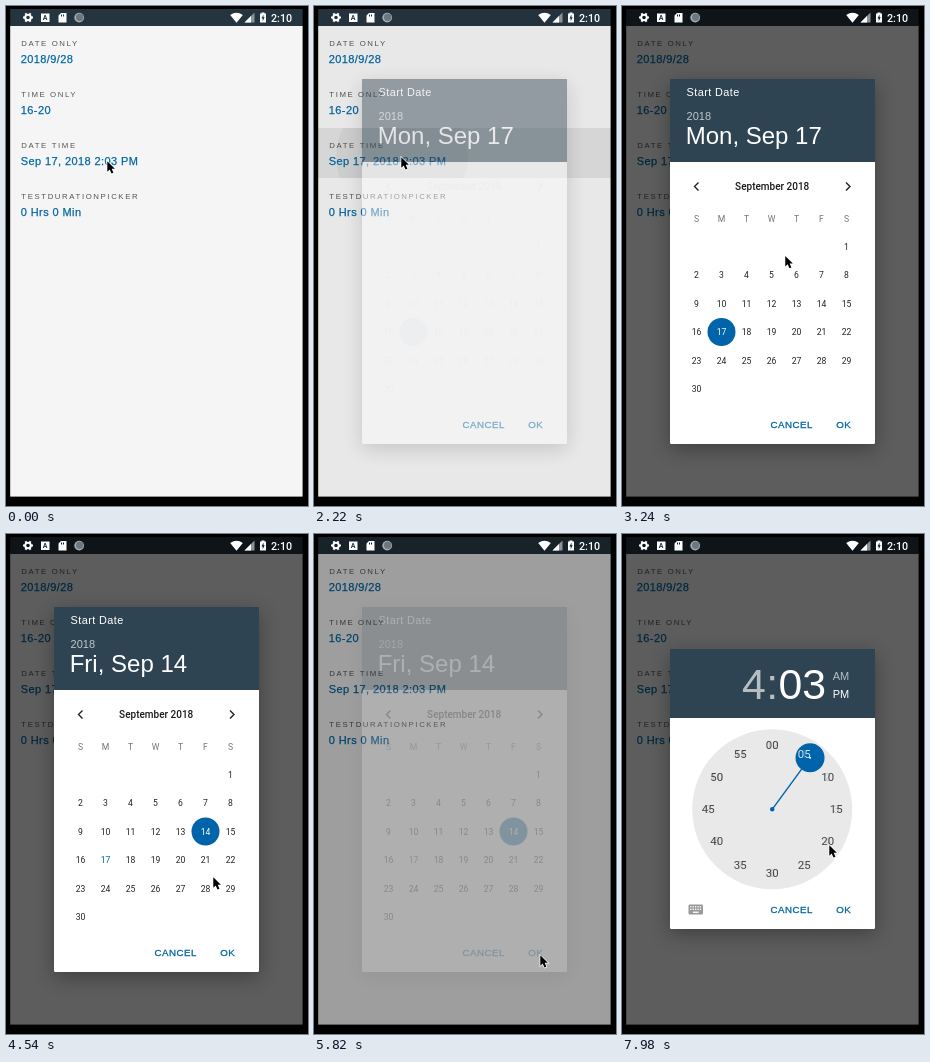
Animation, 302 px wide and 500 px high, one loop 8 s. Source, as an HTML page with a canvas:

```html
<!DOCTYPE html>
<html lang="en">
<head>
<meta charset="utf-8">
<title>Date and time picker</title>
<style>
  html, body { margin: 0; width: 100%; height: 100%; overflow: hidden; background: #000; }
  canvas { display: block; }
</style>
</head>
<body>
<canvas id="stage" width="302" height="500"></canvas>
<script>
const LOOP = 8000, W = 302, H = 500;
const BLUE = '#0064ab', LINK = '#0067a3', HEADER = '#2f4453';
const UI = '"Liberation Sans", Arial, sans-serif', NUM = 'Roboto, sans-serif';
const stage = document.getElementById('stage').getContext('2d');
const layerCanvas = Object.assign(document.createElement('canvas'), { width: W, height: H });
const layer = layerCanvas.getContext('2d');

const clamp = u => Math.max(0, Math.min(1, u));
const ramp = (t, from, to) => clamp((t - from) / (to - from));
const smooth = u => u * u * (3 - 2 * u);
const easeOut = u => 1 - (1 - u) ** 3;
const mix = (a, b, u) => a + (b - a) * u;

// "bolder" thickens the glyphs by a thin outline, for a medium weight
function text(c, str, x, y, size, color, { font = UI, weight = 400, align = 'left', spacing = 0, bolder = 0 } = {}) {
  c.font = `${weight} ${size}px ${font}`;
  c.letterSpacing = spacing + 'px';
  c.textAlign = align;
  c.fillStyle = c.strokeStyle = color;
  c.fillText(str, x, y);
  if (bolder) {
    c.lineWidth = bolder;
    c.strokeText(str, x, y);
  }
}
function rect(c, x, y, w, h, color) {
  c.fillStyle = color;
  c.fillRect(x, y, w, h);
}
function disc(c, x, y, r, color) {
  c.fillStyle = color;
  c.beginPath();
  c.arc(x, y, r, 0, 7);
  c.fill();
}
function shape(c, path, color) {
  c.fillStyle = color;
  c.fill(new Path2D(path), 'evenodd');
}
function stroke(c, path, color, width) {
  c.strokeStyle = color;
  c.lineWidth = width;
  c.stroke(new Path2D(path));
}

// Pointer stops: time, x, y
const POINTER = [
  [20, 102, 155], [180, 88, 151], [2800, 88, 151], [3500, 198, 294], [3800, 200, 296],
  [4300, 200, 296], [4540, 208, 343], [4840, 210, 356], [5020, 227, 425], [5200, 227, 425],
  [5340, 227, 421], [6020, 227, 421], [6500, 72, 287], [6620, 68, 284], [7300, 208, 311]
];
function pointerAt(t) {
  const i = POINTER.findIndex(p => p[0] > t);
  if (i === 0) return POINTER[0].slice(1);
  if (i < 0) return POINTER[POINTER.length - 1].slice(1);
  const [a, b] = [POINTER[i - 1], POINTER[i]];
  const u = smooth(ramp(t, a[0], b[0]));
  return [mix(a[1], b[1], u), mix(a[2], b[2], u)];
}
function drawPointer(t) {
  const [x, y] = pointerAt(t);
  stage.save();
  stage.translate(x - .7, y + .3);
  const arrow = 'M0 0V10.4L2.4 8.2L4.2 12.2L6.1 11.4L4.400 7.500H7.600Z';
  stroke(stage, arrow, '#fff', 1.4);
  shape(stage, arrow, '#000');
  stage.restore();
}

function drawStatusIcons() {
  const c = stage, white = '#fff';
  c.strokeStyle = white;
  c.lineWidth = 2;
  for (let i = 0; i < 6; i++) {
    const a = i * Math.PI / 3, dx = Math.cos(a), dy = Math.sin(a);
    c.beginPath();
    c.moveTo(22 + dx * 3, 11.5 + dy * 3);
    c.lineTo(22 + dx * 5, 11.5 + dy * 5);
    c.stroke();
  }
  c.beginPath();
  c.arc(22, 11.5, 2.8, 0, 7);
  c.stroke();
  rect(c, 35, 7.5, 8.5, 8.5, white);
  text(c, 'A', 39.2, 14.4, 7, '#22313b', { font: NUM, weight: 700, align: 'center' });
  shape(c, 'M55 7H60.5V16.5H52.5V9.5ZM55 8.5V10.5H56V8.5ZM57 8.5V10.5H58V8.5Z', white);
  disc(c, 73.2, 11.6, 4.9, '#a5adb2');
  disc(c, 73.7, 11.2, 3.7, '#6c777f');
  shape(c, 'M224.200 9Q230.500 4.400 236.800 9L230.500 16.700Z', white);
  shape(c, 'M248.500 6.500V16.500H238.500Z', '#8a949a');
  shape(c, 'M245 10V16.500H238.500Z', white);
  shape(c, 'M255.500 6.500H258.500V7.500H260V16.500H254V7.500H255.500ZM257.500 8.500L255.500 12.500H256.700V15.300L258.700 11.200H257.500Z', white);
  text(c, '2:10', 265, 15.5, 10.7, white, { font: NUM, weight: 500 });
}

const ROWS = [
  ['DATE ONLY', '2018/9/28'],
  ['TIME ONLY', '16-20'],
  ['DATE TIME', 'Sep 17, 2018 2:03 PM'],
  ['TESTDURATIONPICKER', '0 Hrs 0 Min']
];
function drawList(t) {
  rect(stage, 4.2, 20, 292.4, 470.6, '#f5f5f5');
  rect(stage, 4.2, 3, 292.4, 17, '#253540');
  const press = ramp(t, 2150, 2200) * (1 - ramp(t, 2280, 2480));
  if (press > 0) {
    stage.save();
    stage.beginPath();
    stage.rect(4, 122, 293, 50);
    stage.clip();
    stage.globalAlpha = press;
    rect(stage, 4, 122, 293, 50, 'rgba(0,0,0,.08)');
    disc(stage, 88, 151, mix(20, 110, ramp(t, 2160, 2280)), 'rgba(0,0,0,.04)');
    stage.restore();
  }
  ROWS.forEach(([label, value], i) => {
    text(stage, label, 15.3, 39.8 + 51 * i, 7.8, '#555', { spacing: 1.6 });
    text(stage, value, 14.8, 56.8 + 51 * i, 11, LINK, { spacing: .4, bolder: .25 });
  });
}

function drawPanel(top, split, bottom) {
  layer.save();
  layer.shadowColor = 'rgba(0,0,0,.33)';
  layer.shadowBlur = 20;
  layer.shadowOffsetY = 5;
  layer.fillStyle = '#fff';
  layer.beginPath();
  layer.roundRect(48, top, 205, bottom - top, 1.5);
  layer.fill();
  layer.restore();
  rect(layer, 48, top, 205, split - top, HEADER);
  const button = { align: 'center', spacing: .5, bolder: .3 };
  text(layer, 'CANCEL', 169.700, bottom - 16.500, 9.7, LINK, button);
  text(layer, 'OK', 221.700, bottom - 16.500, 9.7, LINK, button);
}

function drawDatePicker(t) {
  const selected = t < 4100 ? 17 : 14;
  drawPanel(73, 156, 438);
  text(layer, 'Start Date', 64.6, 89.5, 10.9, '#fff', { spacing: .4 });
  text(layer, '2018', 64.6, 113.700, 11, 'rgba(255,255,255,.7)');
  text(layer, selected === 17 ? 'Mon, Sep 17' : 'Fri, Sep 14', 63.7, 138.2, 24, '#fff');

  layer.globalAlpha = ramp(t, 2210, 2430);
  stroke(layer, 'M76.500 176.500L72.500 180.500L76.500 184.500M224 176.500L228 180.500L224 184.500', '#222', 1.4);
  text(layer, 'September 2018', 150.2, 184.2, 10, '#1c1c1c', { font: NUM, weight: 500, align: 'center' });
  const cell = { font: NUM, align: 'center' };
  [...'SMTWTFS'].forEach((d, i) => text(layer, d, 74.5 + 25 * i, 216.4, 8.6, '#757575', cell));
  for (let day = 1; day <= 30; day++) {
    const slot = day + 5;
    const x = 74.5 + 25 * (slot % 7), y = 240.5 + 28.5 * Math.floor(slot / 7);
    if (day === selected) disc(layer, x, y, 14, BLUE);
    const color = day === selected ? '#fff' : day === 17 ? BLUE : '#222';
    text(layer, day, x, y + 3.1, 8.6, color, cell);
  }
  layer.globalAlpha = 1;
}

function drawNumbers(hourAlpha, minuteAlpha, color) {
  const style = { font: NUM, align: 'center' };
  for (let i = 0; i < 12; i++) {
    const a = i * Math.PI / 6, x = 150.2 + 64 * Math.sin(a), y = 279.2 - 64 * Math.cos(a);
    layer.globalAlpha = hourAlpha;
    text(layer, i || 12, x, y, 11.4, color, style);
    layer.globalAlpha = minuteAlpha;
    text(layer, String(i * 5).padStart(2, '0'), x, y, 11.4, color, style);
  }
  layer.globalAlpha = 1;
}

function drawTimePicker(t) {
  const hour = t < 7480 ? 2 : 4, minutes = t >= 7620;
  const change = (1 - Math.cos(Math.PI * ramp(t, 7620, 8120))) / 2;
  const dim = 'rgba(255,255,255,.65)';
  drawPanel(115, 184, 395);
  text(layer, hour, 143.700, 164.700, 42.8, minutes ? dim : '#fff', { align: 'right' });
  text(layer, ':', 150.300, 164.700, 42.8, dim, { align: 'center' });
  text(layer, '03', 156.500, 164.700, 42.8, minutes ? '#fff' : dim);
  text(layer, 'AM', 210.700, 146, 11, dim);
  text(layer, 'PM', 210.700, 164, 11, '#fff');

  disc(layer, 150.2, 275.3, 80, '#e9e9e9');
  const angle = mix(hour * 30, 18, change) * Math.PI / 180;
  const x = 150.2 + 64 * Math.sin(angle), y = 275.3 - 64 * Math.cos(angle);
  drawNumbers(1 - change, change, '#222');
  stroke(layer, `M150.200 275.300L${x} ${y}`, BLUE, 1.4);
  disc(layer, 150.2, 275.3, 2.2, BLUE);
  disc(layer, x, y, 14.5, BLUE);
  layer.save();
  layer.clip();
  drawNumbers(1 - change, change, '#fff');
  layer.restore();
  if (minutes) disc(layer, x, y, 1, '#fff');

  layer.fillStyle = '#999';
  layer.beginPath();
  layer.roundRect(66.500, 370.500, 14.500, 10, 1.2);
  layer.fill();
  for (let i = 0; i < 10; i++)
    rect(layer, 68.2 + (i % 5) * 2.4, 372.2 + (i > 4 ? 2.5 : 0), 1.3, 1.3, '#fff');
  rect(layer, 71, 377.6, 5.6, 1.3, '#fff');
}

function showDialog(draw, t, alpha) {
  if (alpha <= 0) return;
  layer.clearRect(0, 0, W, H);
  draw(t);
  stage.globalAlpha = alpha;
  stage.drawImage(layerCanvas, 0, 0);
  stage.globalAlpha = 1;
}

function render(t) {
  const dateIn = ramp(t, 2180, 2400), timeIn = ramp(t, 5900, 6120);
  const scrim = Math.max(smooth(dateIn) * (1 - ramp(t, 5740, 5930)), smooth(timeIn));
  rect(stage, 0, 0, W, H, '#000');
  drawList(t);
  rect(stage, 4, 3, 293, 488, `rgba(0,0,0,${.62 * scrim})`);
  drawStatusIcons();
  showDialog(drawDatePicker, t, easeOut(dateIn) * (1 - ramp(t, 5740, 5838)));
  showDialog(drawTimePicker, t, easeOut(timeIn));
  drawPointer(t);
}

function tick() {
  render(performance.now() % LOOP);
  requestAnimationFrame(tick);
}
tick();
</script>
</body>
</html>
```
